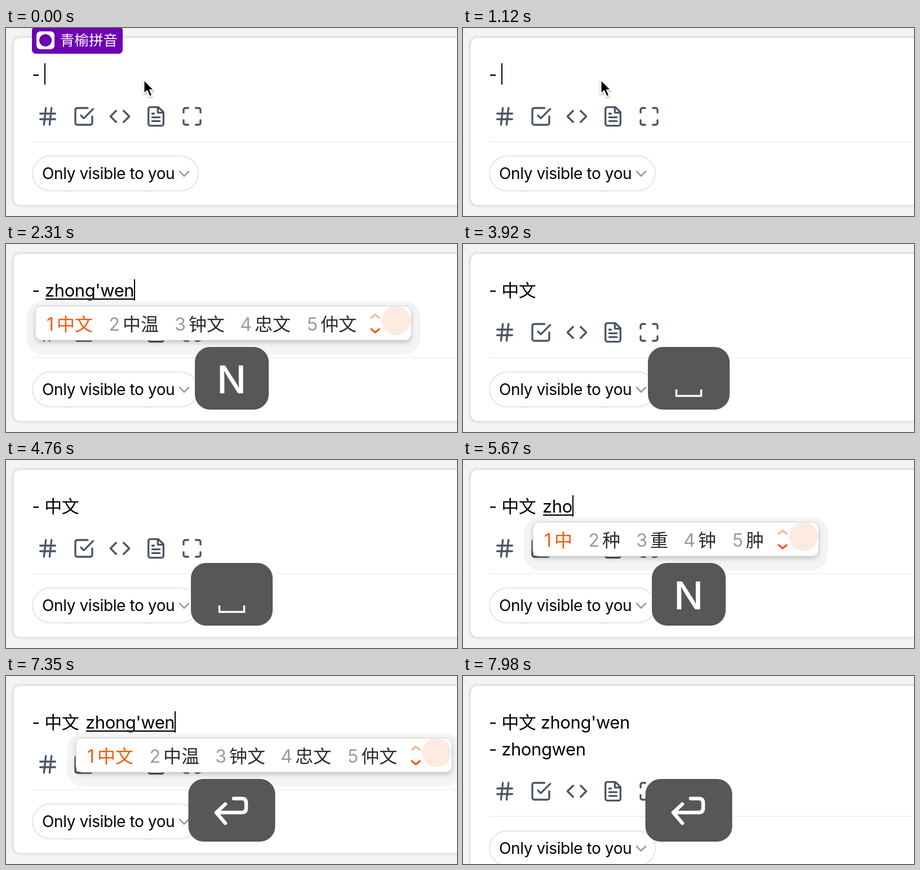
An HTML page for the animation above (8000 ms loop, 800 px wide and 336 px high).

```html
<!DOCTYPE html>
<html lang="zh-CN">
<head>
<meta charset="utf-8">
<title>Pinyin input in an editor</title>
<style>
  html, body { margin: 0; width: 100%; height: 100%; overflow: hidden; background: #f3f3f3; }
  svg { display: block; width: 800px; height: 336px; }
  text { font-family: Inter, "Noto Sans CJK SC", "Noto Sans CJK", sans-serif; white-space: pre; }
  .line { font-size: 31px; letter-spacing: -.4px; }
  .icons path { fill: none; stroke: #4b5563; stroke-width: 2; stroke-linecap: round; stroke-linejoin: round; }
  .cand { font-size: 32px; fill: #2b2b2b; }
  .num { font-size: 32px; fill: #9b9b9b; text-anchor: end; }
  .first { fill: #f4580e; }
  .arrow { fill: none; stroke-width: 3.4; stroke-linecap: round; stroke-linejoin: round; }
  .glyph { fill: none; stroke: #fff; }
</style>
</head>
<body>
<svg viewBox="0 0 800 336">
  <defs>
    <filter id="soft" x="-10%" y="-40%" width="120%" height="200%"><feGaussianBlur stdDeviation="4"/></filter>
    <filter id="drop" x="-50%" y="-50%" width="200%" height="200%">
      <feDropShadow dx="0" dy="2" stdDeviation="1.5" flood-opacity=".35"/>
    </filter>
    <clipPath id="panelClip"><rect id="clipBox" y="111" height="61" rx="11"/></clipPath>
  </defs>

  <rect width="800" height="336" fill="#f3f3f3"/>
  <rect id="card" x="12" y="16" width="900" height="302" rx="13" fill="#fff" stroke="#e5e5e8" stroke-width="4"/>

  <g id="lower">
    <g id="icons" class="icons"></g>
    <path d="M46 203H800" stroke="#f2f2f3" stroke-width="2"/>
    <rect x="47" y="229" width="294" height="62" rx="31" fill="#fff" stroke="#e5e5e7" stroke-width="2"/>
    <text x="64" y="270" font-size="28" letter-spacing="-.4">Only visible to you</text>
    <path d="M308 256.500l8 8 8-8" fill="none" stroke="#9a9a9a" stroke-width="2.600" stroke-linecap="round" stroke-linejoin="round"/>
  </g>

  <text id="line1" class="line" x="46" y="94"></text>
  <text id="line2" class="line" x="46" y="142"></text>
  <text id="pinyin" class="line" y="94"></text>
  <rect id="under" y="97" height="3" fill="#333"/>
  <rect id="caret" width="2" height="38"/>

  <g id="panel"></g>
  <g id="key"></g>

  <g id="badge">
    <rect x="46" y="-3" width="161" height="49" rx="7" fill="#6d00b3"/>
    <rect x="54" y="6" width="32" height="32" rx="7" fill="#fff"/>
    <circle cx="70" cy="22" r="11" fill="#6d00b3"/>
    <text x="96" y="31" font-size="25.500" font-weight="500" fill="#fff">青榆拼音</text>
  </g>

  <path id="mouse" d="M244.500 92.500V117.500L250.300 112.200L254.800 122.300L259.400 120.300L255 110.700H262.500Z"
        stroke="#fff" stroke-width="2" stroke-linejoin="round" filter="url(#drop)"/>
</svg>

<script>
const LOOP = 8000, BLINK = 490, TICK = 70;
const $ = id => document.getElementById(id);
const set = (el, attrs) => { for (const k in attrs) el.setAttribute(k, attrs[k]); };
const show = (el, on) => { el.style.visibility = on ? 'visible' : 'hidden'; };

const ICONS = [
  'M4 9h16M4 15h16M10 3L8 21M16 3l-2 18',
  'M9 11l3 3L22 4M21 12v7a2 2 0 0 1-2 2H5a2 2 0 0 1-2-2V5a2 2 0 0 1 2-2h11',
  'M16 18l6-6-6-6M8 6l-6 6 6 6',
  'M14.500 2H6a2 2 0 0 0-2 2v16a2 2 0 0 0 2 2h12a2 2 0 0 0 2-2V7.500zM14 2v6h6M16 13H8M16 17H8M10 9H8',
  'M8 3H5a2 2 0 0 0-2 2v3M21 8V5a2 2 0 0 0-2-2h-3M3 16v3a2 2 0 0 0 2 2h3M16 21h3a2 2 0 0 0 2-2v-3'
];
$('icons').innerHTML = ICONS.map((d, i) =>
  `<path transform="translate(${54 + 64 * i} 138) scale(1.6667)" d="${d}"/>`).join('');

const CANDIDATES = {
  z: '在 这 中 子 做',
  zh: '中 种 重 钟 肿',
  zho: '中 种 重 钟 肿',
  zhon: '中 种 重 钟 终',
  zhong: '中 种 重 钟 终',
  "zhong'w": '中文 中午 中外 中网 中位',
  "zhong'we": '中文 中温 中外 钟文 中卫',
  "zhong'wen": '中文 中温 钟文 忠文 仲文'
};

const KEY_WIDTH = { Z: 127, O: 133, W: 148, E: 124, space: 145, enter: 154 };
const KEY_ART = {
  space: '<path class="glyph" stroke-width="3.500" d="M378.500 260V271.500H422.500V260"/>',
  enter: '<path class="glyph" stroke-width="6.500" stroke-linecap="round" stroke-linejoin="round" ' +
    'd="M404 219H418Q426 219 426 227V236Q426 244 418 244H373M389 229L373 244L389 263"/>'
};

// Each step overrides part of the state from its time on.
const STEPS = [
  [-140, { text: '- ', line2: '', py: '', key: '', at: 69 }],
  [1190, { key: 'Z' }],
  [1260, { py: 'z' }],
  [1400, { key: 'H' }],
  [1470, { py: 'zh' }],
  [1610, { key: 'O', py: 'zho' }],
  [1750, { key: 'N', py: 'zhon' }],
  [1890, { key: 'G', py: 'zhong' }],
  [2030, { key: 'W', py: "zhong'w" }],
  [2170, { key: 'E', py: "zhong'we" }],
  [2310, { key: 'N', py: "zhong'wen" }],
  [3150, { key: 'space' }],
  [3290, { text: '- 中文', py: '' }],
  [3430, { text: '- 中文' }],
  [4270, { text: '- 中文 ', at: 141 }],
  [5250, { key: 'Z' }],
  [5320, { py: 'z' }],
  [5390, { key: 'H' }],
  [5460, { key: 'O', py: 'zh' }],
  [5530, { py: 'zho' }],
  [5670, { key: 'N' }],
  [5740, { py: 'zhon' }],
  [5810, { key: 'G' }],
  [5880, { py: 'zhong' }],
  [6020, { key: 'W' }],
  [6090, { py: "zhong'w" }],
  [6160, { key: 'E', py: "zhong'we" }],
  [6300, { key: 'N' }],
  [6370, { py: "zhong'wen" }],
  [7350, { key: 'enter' }],
  [7420, { text: "- 中文 zhong'wen", py: '' }],
  [7490, { line2: '- zhongwen' }]
];

function stateAt(t) {
  const s = { edited: 0 };
  for (const [time, change] of STEPS) {
    if (time > t) break;
    Object.assign(s, change);
    if ('text' in change || 'py' in change || 'line2' in change) s.edited = time;
  }
  return s;
}

function panelMarkup(py, x) {
  const words = CANDIDATES[py].split(' ');
  const pitch = words[0].length * 32 + 53;
  const width = 82 + 5 * pitch, ax = x + 18 + 5 * pitch;
  set($('clipBox'), { x, width });
  const items = words.map((word, i) => {
    const wx = x + 38 + pitch * i, cls = i ? '' : ' first';
    return `<text class="num${cls}" x="${wx - 5}" y="155">${i + 1}</text>` +
           `<text class="cand${cls}" x="${wx}" y="155">${word}</text>`;
  }).join('');
  return `<rect x="${x - 16}" y="102" width="${width + 32}" height="95" rx="28" fill="#000" opacity=".045"/>
    <rect x="${x}" y="115" width="${width}" height="61" rx="11" opacity=".2" filter="url(#soft)"/>
    <rect x="${x}" y="111" width="${width}" height="61" rx="11" fill="#fff" stroke="#d2d2d2"/>
    <circle cx="${x + width - 27}" cy="137" r="26" fill="#fdebe2" clip-path="url(#panelClip)"/>
    ${items}
    <path class="arrow" stroke="#fab793" d="M${ax - 7} 132l7-6 7 6"/>
    <path class="arrow" stroke="#f4580e" d="M${ax - 7} 152l7 6 7-6"/>`;
}

function keyMarkup(key) {
  const w = KEY_WIDTH[key] || 131;
  const art = KEY_ART[key] ||
    `<text x="400" y="267" font-size="69" font-weight="500" fill="#fff" text-anchor="middle">${key}</text>`;
  return `<rect x="${400.5 - w / 2}" y="184" width="${w}" height="112" rx="27" fill="#575757"/>${art}`;
}

function drawState(s) {
  $('line1').textContent = s.text;
  $('line2').textContent = s.line2;
  $('pinyin').textContent = s.py;
  set($('pinyin'), { x: s.at });

  const run = s.py ? $('pinyin') : s.line2 ? $('line2') : $('line1');
  const end = (s.py ? s.at : 46) + run.getComputedTextLength();
  set($('caret'), { x: Math.round(end), y: s.line2 ? 111 : 63 });
  set($('under'), { x: s.at + 1, width: s.py ? Math.max(0, end - s.at) : 0 });

  const shift = s.line2 ? 48 : 0;
  set($('lower'), { transform: `translate(0 ${shift})` });
  set($('card'), { height: 302 + shift });
  $('panel').innerHTML = s.py ? panelMarkup(s.py, s.at - 17) : '';
  $('key').innerHTML = s.key ? keyMarkup(s.key) : '';
}

let drawn = '';
function render(t) {
  const s = stateAt(t), id = JSON.stringify(s);
  if (id !== drawn) { drawState(s); drawn = id; }
  show($('caret'), Math.floor((t - s.edited) / BLINK) % 2 === 0);
  show($('mouse'), t < 1260);
  const fade = Math.floor((t - 700) / TICK) + 1;
  $('badge').style.opacity = Math.min(1, Math.max(0, 1 - fade / 6));
}

const start = performance.now();
function loop() {
  render((performance.now() - start) % LOOP);
  requestAnimationFrame(loop);
}
loop();
</script>
</body>
</html>
```
